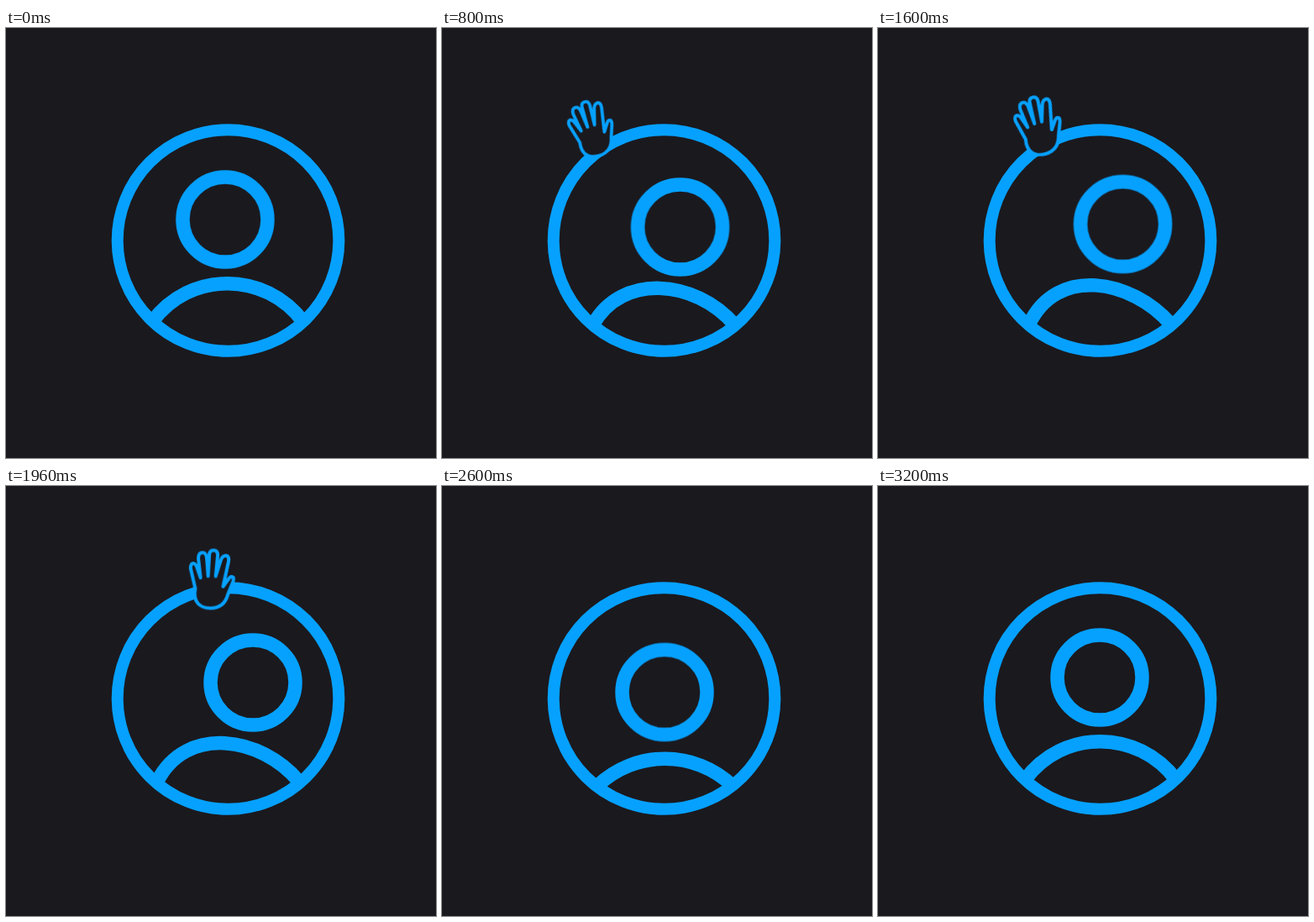
Recreate the animation shown at these times as an HTML page without scripts. Size 512 by 512 pixels, loop 4.08 s.

```html
<!DOCTYPE html>
<html lang="en">
<head>
<meta charset="utf-8">
<title>Waving avatar</title>
<style>
  :root { --bg: #1a191e; --ink: #06a1ff; }
  html, body { margin: 0; width: 100%; height: 100%; overflow: hidden; background: var(--bg); }
  svg { display: block; width: 100vw; height: 100vh; }
  .line { fill: none; stroke: var(--ink); }
  .ring { stroke-width: 14; }
  .head, .body { stroke-width: 16.5; }
  .hand {
    fill: var(--bg); stroke-width: 4; stroke-linejoin: round;
    transform-origin: 239px 145px;
  }
  .head, .body, .hand { animation: 4080ms ease-in-out infinite; }
  .head { animation-name: head; }
  .body { animation-name: body; }
  .hand { animation-name: wave; }

  /* lean left, swing right for the wave, dip, settle */
  @keyframes head {
    0% { transform: translate(261px, 228px); animation-timing-function: ease-out; }
    6.37% { transform: translate(247px, 233px); animation-timing-function: ease-in; }
    12.745% { transform: translate(261px, 220.5px); animation-timing-function: ease-out; }
    19.608% { transform: translate(283.5px, 237px); }
    30.392% { transform: translate(289px, 233px); }
    48.039% { transform: translate(294px, 234px); }
    54.9% { transform: translate(288px, 236px); }
    63.725% { transform: translate(265px, 245.5px); }
    72% { transform: translate(264px, 225px); }
    78.431%, 100% { transform: translate(264px, 228px); }
  }
  @keyframes body {
    0% { d: path("M174 350C218 289 309 289 354 350"); animation-timing-function: ease-out; }
    6.37% { d: path("M177 351C222 295 313 288 353 351"); animation-timing-function: ease-in; }
    12.745% { d: path("M174 349C217 284 311 284 356 349"); animation-timing-function: ease-out; }
    19.608% { d: path("M180 353C214 292 301 299 348 353"); }
    30.392% { d: path("M180 353C212 282 299 300 348 353"); }
    48.039% { d: path("M180 352C214 284 304 298 349 352"); }
    54.9% { d: path("M181 353C218 290 304 301 348 353"); }
    63.725% { d: path("M185 357C230 314 301 314 346 357"); }
    72% { d: path("M174 349C218 286 311 286 355 349"); }
    78.431%, 100% { d: path("M175 350C219 289 310 289 355 350"); }
  }
  @keyframes wave {
    0%, 15% { transform: translate(-84px, 32px) rotate(-45deg) scale(0); animation-timing-function: ease-out; }
    17.2% { transform: translate(-80px, 24px) rotate(-38deg) scale(.9); animation-timing-function: linear; }
    19.608% { transform: translate(-52px, 7px) rotate(-18deg) scale(.96); animation-timing-function: ease-out; }
    27% { transform: translate(4px, 0) rotate(3deg); }
    30.392% { transform: none; }
    39% { transform: translate(-40px, 5px) rotate(-15deg); }
    47.4% { transform: translate(5px, 0) rotate(2deg); }
    48.039% { transform: translate(4px, .5px) rotate(1deg); }
    55.4% { transform: translate(-34px, 4px) rotate(-13deg); }
    59.3% { transform: translate(6px, -6px) rotate(3deg); animation-timing-function: ease-in; }
    62.5%, 100% { transform: translate(6px, 4px) rotate(3deg) scale(0); }
  }
</style>
</head>
<body>
<svg viewBox="0 0 512 512" role="img" aria-label="Avatar waving a hand">
  <circle class="line ring" cx="264.5" cy="253" r="131.8"/>
  <path class="line body" d="M175 350C219 289 310 289 355 350"/>
  <circle class="line head" r="50.5"/>
  <path class="line hand" d="M221 122L215 98Q215 92 218 92Q221 92 223 98L227 109L224 86Q224 79 229 79Q233 79 234 85L236 107L237 82Q237 76 242 76Q247 76 247 82L245 107L251 87Q253 82 257 82Q261 83 260 89L254 119L261 109Q263 106 266 108Q267 110 265 115L260 128C257 140 250 145 239 145C227 145 218 138 221 122Z"/>
</svg>
</body>
</html>
```
